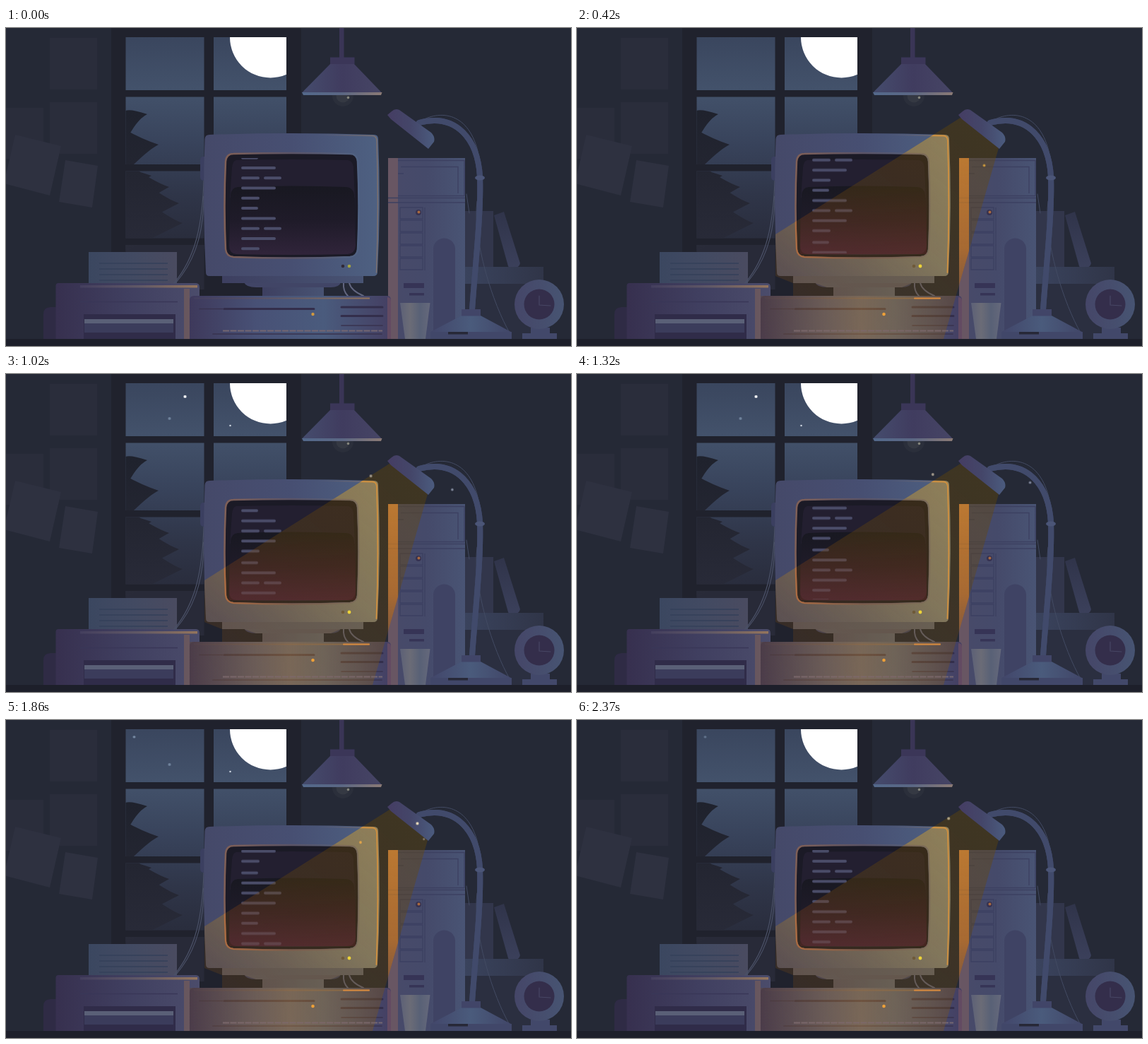
These frames come from a looping animation (800 px wide and 450 px high, 2.4 s). An HTML page:

```html
<!DOCTYPE html>
<html lang="en">
<head>
<meta charset="utf-8">
<title>Night desk</title>
<style>
html, body { margin: 0; width: 100%; height: 100%; overflow: hidden; background: #252936; }
svg { display: block; width: 100%; height: 100%; }
.line { fill: none; stroke-linecap: round; }
</style>
</head>
<body>
<svg viewBox="0 0 800 450">
<defs id="grads"></defs>
<defs>
  <path id="case" d="M288 151Q404 147 521 151Q527 151 527 157Q531 255 526 345Q526 351 520 351H288Q283 351 283 346Q278 255 281.500 157Q282 151 288 151Z"/>
  <path id="bezel" d="M322 178Q404 176 487 178Q497 178 498 189Q501 252 498 313Q497 323 487 324Q404 327 322 324Q312 323 311 313Q308 252 311 189Q312 178 322 178Z"/>
  <path id="rim" d="M440 151L519 152.500Q525 153 525 160Q528 255 524.500 346"/>
  <path id="drive" d="M266 379H540Q545 379 545 385V440H260V385Q260 379 266 379Z"/>
  <clipPath id="panes"><path id="paneShapes" d="M169.500 13H280.500V88H169.500ZM294 13H397V88H294ZM169.500 97.500H280.500V193H169.500ZM294 97.500H397V193H294ZM169.500 202.500H280.500V297.500H169.500ZM169.500 307H280.500V370H169.500Z"/></clipPath>
  <clipPath id="text"><rect x="325" y="184.500" width="80" height="134"/></clipPath>
  <clipPath id="cone"><path d="M546 125L281 292V351L306 361V379H260V440H519L597 170Z"/></clipPath>
  <mask id="offScreen"><rect width="800" height="450" fill="#fff"/><use href="#bezel" fill="#000"/></mask>
</defs>

<rect width="800" height="450" fill="#252936"/>

<!-- notes -->
<path d="M62 14H129V87H62ZM62 105H129V178H62ZM0 113H53V185H0Z" fill="#2a2d3b"/>
<path d="M13 151L78 167L62 237L-3 220ZM84 187L130 195L122 254L75 246Z" fill="#2e3140"/>

<!-- window -->
<rect x="149" width="269" height="440" fill="#20222d"/>
<g clip-path="url(#panes)">
  <rect x="169" y="13" width="229" height="300" fill="url(#sky)"/>
  <rect x="169" y="307" width="112" height="63" fill="#282a38"/>
  <circle cx="374.500" cy="13" r="57.500" fill="#fff"/>
  <path id="tree" fill="url(#pine)"/>
</g>
<g id="stars"></g>

<!-- ceiling lamp -->
<rect x="472" width="6.500" height="42" fill="#3a3556"/>
<circle cx="477" cy="96" r="15" fill="#2b2f3b"/>
<circle cx="477" cy="96" r="9.500" fill="#353943"/>
<circle cx="484.500" cy="98.500" r="1.800" fill="#85857c"/>
<path d="M459 51H493L532 91.500H419Z" fill="url(#shade)"/>
<path d="M459 41.500H493.500V51H459Z" fill="#3b3658"/>
<path d="M419 91H532.500L531 95H421Z" fill="url(#shadeRim)"/>

<!-- books and clock -->
<path d="M650 362H745V440H650Z" fill="#2b2f40"/>
<path d="M650 259H690V338H650Z" fill="#32364b"/>
<path d="M691 265L705 260L728 333Q727 339 718 340Q712 340 711 337Z" fill="url(#book)"/>
<path d="M650 338H761V362H650Z" fill="url(#shelf)"/>
<path d="M743 424H770V432H780V440H731V432H743Z" fill="#42486a"/>
<circle cx="755" cy="391" r="35" fill="url(#clock)"/>
<circle cx="755" cy="391" r="21.500" fill="#342e4b"/>
<path class="line" d="M755 379V392L771 393" stroke="#484765" stroke-width="1.200"/>

<!-- tower -->
<path d="M541 184H650V440H541Z" fill="url(#tower)"/>
<path d="M541 184H555V440H541Z" fill="#685663"/>
<path id="bays" d="M555 187.500H649V237.500H555M559 196.500H640V234M541 240.500H650M541 247H650M555 206H563M593 254V343" fill="none" stroke="#3c4061" stroke-width="1.300"/>
<path d="M605 440V313A15.500 15.500 0 0 1 636 313V440Z" fill="#3f4364"/>
<path d="M563 361H592V368H563ZM571 375H592V378.500H571Z" fill="#363456"/>
<circle cx="584" cy="261" r="4" fill="#373250"/>
<circle cx="584.500" cy="260.500" r="2" fill="#a8693f"/>

<!-- printer -->
<path d="M53 440V405Q53 395 63 395H72V440Z" fill="#2f2b45"/>
<path d="M117 317H242V362H117Z" fill="url(#paper)"/>
<path id="print" stroke="#35405a" stroke-width="1.500"/>
<path d="M74 361H269Q274 361 274 367V440H70.500V365Q70.500 361 74 361Z" fill="url(#printer)"/>
<rect x="105" y="364" width="166" height="3.500" fill="url(#warmEdge)"/>
<path d="M252 369H260V440H252Z" fill="#735b5b" opacity=".75"/>
<path d="M105 387.500H243" stroke="#393757" stroke-width="1.500"/>
<path d="M110 405H240V440H110Z" fill="#302c49"/>
<path d="M111 412H237V418H111Z" fill="#5a6077"/>
<path d="M111 418H237V431H111Z" fill="#3b3c5b"/>

<!-- cables -->
<g class="line" stroke="#4a5066" stroke-width="1.200">
  <path d="M280 216C278 280 268 325 238 361M280 238C280 300 262 336 240 361"/>
  <path d="M478 361Q477 372 484 379M486 361Q489 372 506 379" stroke="#62667f" stroke-width="2"/>
</g>

<!-- computer -->
<use href="#drive" fill="url(#driveBody)"/>
<path d="M540 381Q545 381 545 386V440H540Z" fill="#705062" opacity=".7"/>
<rect x="266" y="381.500" width="249" height="2" fill="url(#warmEdge)"/>
<path class="line" d="M309 397.500H436M475 395H533M475 407.500H533" stroke="#332e4b" stroke-width="3"/>
<path class="line" d="M274 397.500H307M475 421H533M293 433H532" stroke="#38334f" stroke-width="1.700"/>
<path id="vent" d="M307 428.500H533" stroke="#746772" stroke-width="2" stroke-dasharray="9 1.500"/>
<circle cx="434.500" cy="405" r="2.200" fill="#cf983f"/>
<path d="M363 366H450V379H363Z" fill="url(#plate)"/>
<path d="M337 360H474Q472 367 460 367H354Q340 367 337 360Z" fill="#414566"/>
<path d="M306 350H506V361H306Z" fill="url(#plate)"/>
<path d="M282 182H279Q275 182 275 187V211Q275 216 281 216Z" fill="#3b3f60"/>
<use href="#case" fill="url(#body)"/>
<use href="#rim" class="line" stroke="url(#rimOff)" stroke-width="1.500"/>
<use href="#bezel" fill="#1b1a26" stroke="url(#bezelOff)" stroke-width="2.500"/>
<path d="M326 187Q404 185 484 187Q491 188 492 197L494 240H317L320 197Q321 188 326 187Z" fill="#231f30"/>
<path id="glassShape" d="M328 225Q404 222 482 225Q492 226 493 236L495 308Q494 319 484 320Q404 322 326 320Q316 319 316 308L318 236Q319 226 328 225Z" fill="url(#glass)"/>
<g clip-path="url(#text)"><path id="code" class="line" stroke="#4b4d69" stroke-width="4"/></g>
<circle cx="477" cy="337" r="2.300" fill="#302a38"/>
<circle cx="486" cy="337" r="2.300" fill="#a3a443"/>

<!-- light -->
<g id="light" opacity="0">
  <g clip-path="url(#cone)">
    <path d="M260 110H620V440H260Z" fill="url(#beam)"/>
    <path d="M541 184H555V440H541Z" fill="url(#stripLit)"/>
    <use href="#drive" fill="url(#driveLit)"/>
    <path d="M306 351H506V361H474L460 367H450V379H363V367H354L337 361H306Z" fill="#deba64" opacity=".15"/>
    <use href="#case" fill="url(#bodyLit)" mask="url(#offScreen)"/>
    <use href="#rim" class="line" stroke="#d0903f" stroke-width="1.800"/>
    <use href="#bezel" class="line" stroke="url(#bezelLit)" stroke-width="2"/>
    <path d="M316 225H495V320H316Z" fill="url(#glassLit)"/>
    <path class="line" d="M478 382.500H514" stroke="#d68a40" stroke-width="2"/>
    <use href="#vent" opacity=".7" style="stroke: #b57a48"/>
  </g>
  <circle cx="486" cy="337" r="2.400" fill="#ecd23a"/>
  <circle cx="434.500" cy="405" r="2.200" fill="#eda03a"/>
</g>

<!-- cup -->
<path d="M558 389H600.500L594 440H565Z" fill="url(#cup)" opacity=".8"/>

<!-- desk lamp -->
<g class="line">
  <path d="M590 130C622 114 662 124 671 190M667 245C660 300 690 392 713 431M652 235L656 262" stroke="#434b63" stroke-width="1"/>
  <path id="arm" d="M660 399C664 340 673 262 671 210C668 158 638 120 585 134" stroke="#414a6b" stroke-width="8"/>
  <use href="#arm" style="stroke: #4a5d7d; stroke-width: 4"/>
</g>
<ellipse cx="671" cy="212" rx="7" ry="3.500" fill="#4b5577"/>
<path d="M645 407H672L715 430V440H601V430Z" fill="url(#foot)"/>
<path d="M645 398H672V407.500H645Z" fill="#414568"/>
<path d="M601 430H716V440H601Z" fill="#414769"/>
<path d="M626 430H654V433.500H626Z" fill="#272837"/>
<path d="M540 123L546 118Q551 113 557 116L602 148Q608 154 606 161L598 171L545 129Z" fill="url(#head)"/>

<g id="dust"></g>
<rect y="440" width="800" height="10" fill="#1d1f2a"/>
</svg>

<script>
const LOOP = 2400, FADE = 45;
const $ = id => document.getElementById(id);

// direction (right, down, or diagonal to lower left), then evenly spaced colours
const axes = {
  right: 'x2="1" y2="0"',
  down: 'x2="0" y2="1"',
  diagonal: 'x1="1" y1="0" x2="0" y2="1"'
};
const grads = {
  sky: 'down #3a465e #43526b #38435b #2f3548 #282b3a',
  pine: 'down #1f222d #242632 #292b39',
  shade: 'right #454c6d #403c5f #464565',
  shadeRim: 'right #53698b #5b6784 #8b7a75',
  book: 'down #30344a #3b405b',
  shelf: 'right #3a435d #303548',
  clock: 'right #454668 #475472',
  tower: 'right #484a69 #454a6a #495474',
  paper: 'right #3b4760 #424a62 #4a4b60',
  printer: 'right #37304f #403f60 #4b4c6b',
  warmEdge: 'right #443f5e #605866 #94755c',
  driveBody: 'right #3e395b #485176 #4a5b7d #443f62',
  plate: 'right #3d3f60 #485373',
  body: 'right #454969 #474f72 #4e6182',
  rimOff: 'right #6d667200 #7d706d',
  bezelOff: 'right #7f5f56 #5b5466 #506283',
  bezelLit: 'right #ad6b41 #795a4c #7c6c58',
  glass: 'down #181821 #1f1b29 #30243a',
  beam: 'diagonal #694a0066 #6a480b58 #6c44204a',
  bodyLit: 'diagonal #deba6468 #deba6450 #deba6412',
  driveLit: 'right #d8a05000 #d8a05048 #d8a05008',
  stripLit: 'down #e08a2cb0 #d87d2690 #b0602600',
  glassLit: 'down #a0183800 #a0183828',
  cup: 'right #62667a #74747a #5d6679 #6d7080',
  foot: 'right #42466a #4a5b7c #414668',
  head: 'right #453d63 #444669 #4b5b7e'
};
$('grads').innerHTML = Object.entries(grads).map(([id, spec]) => {
  const [axis, ...colours] = spec.split(' ');
  const stops = colours.map((c, i) => `<stop offset="${i / (colours.length - 1)}" stop-color="${c}"/>`);
  return `<linearGradient id="${id}" ${axes[axis]}>${stops.join('')}</linearGradient>`;
}).join('');

const repeat = (n, draw) => Array.from({ length: n }, (_, i) => draw(i)).join('');
const addPath = (id, d) => $(id).setAttribute('d', ($(id).getAttribute('d') || '') + d);

addPath('print', repeat(4, i => `M132 ${333 + i * 8}h97`));
addPath('bays', repeat(5, i => `M558 ${254 + i * 18}h32v16h-32z`));

// each branch sweeps down to its tip and curls back to the trunk
const tips = ['200 122', '216 165', '206 209', '231 225', '245 248', '250 276'];
addPath('tree', tips.map(tip => {
  const [x, y] = tip.split(' ').map(Number);
  return `M169 ${y + 195 - x}Q${x - 24} ${y - 8} ${x} ${y}Q${x - 16} ${y + 8} 169 ${y + 40}Z`;
}).join(''));

// code: a five-row pattern, with a wider gap after every second round
const ROW = 14.28, SPAN = 145;
const rows = ['h20', 'h45', 'h22m10 0h21', 'h45', 'h22'];
addPath('code', repeat(20, i =>
  `M335 ${183.7 + Math.floor(i / 10) * SPAN + i % 10 * ROW}${rows[i % 5]}`));

const play = (el, frames, duration = LOOP) => el.animate(frames, { duration, iterations: Infinity });

play($('code'), [{ transform: 'translateY(0px)' }, { transform: `translateY(${-SPAN}px)` }]);

// the lamp drops out briefly twice per loop
play($('light'), [
  { opacity: 0, offset: 0 }, { opacity: 0, offset: .05 },
  { opacity: 1, offset: .05 }, { opacity: 1, offset: 1 }
], LOOP / 2);

// a speck drifts evenly from one point to another and fades at both ends
function speck(parent, fill, r, start, end, from, to = from) {
  const el = document.createElementNS('http://www.w3.org/2000/svg', 'circle');
  for (const [k, v] of Object.entries({ fill, r, opacity: 0 })) el.setAttribute(k, v);
  $(parent).append(el);
  const at = (t, opacity) => {
    const k = (t - start) / (end - start);
    const [x, y] = from.map((a, i) => a + (to[i] - a) * k);
    return { offset: t / LOOP, opacity, transform: `translate(${x}px, ${y}px)` };
  };
  play(el, [at(start, 0), at(start + FADE, 1), at(end - FADE, 1), at(end, 0)]);
}

speck('stars', '#fff', 2, 480, 1600, [253.5, 32]);
speck('stars', '#70839c', 2, 800, 1950, [231.5, 63]);
speck('stars', '#dde3ee', 1.2, 800, 1950, [317.5, 73]);
speck('stars', '#7c8fa9', 1.8, 1800, LOOP, [181.5, 24]);

speck('dust', '#d9a23c', 1.8, 180, 800, [568, 219], [590, 156]);
speck('dust', '#a39a8c', 1.9, 520, 1480, [538, 148], [497, 141]);
speck('dust', '#858ca0', 1.8, 560, 1460, [617, 179], [646, 149]);
speck('dust', '#f6e8b0', 2, 1500, 1740, [526, 192], [514, 186]);
speck('dust', '#e0a44a', 1.9, 1530, 2160, [554, 159], [455, 186]);
speck('dust', '#8c8070', 1.5, 1530, 2130, [622, 179], [567, 160]);
speck('dust', '#f0e0bc', 2, 1530, LOOP, [619, 151], [523, 139]);
</script>
</body>
</html>
```
